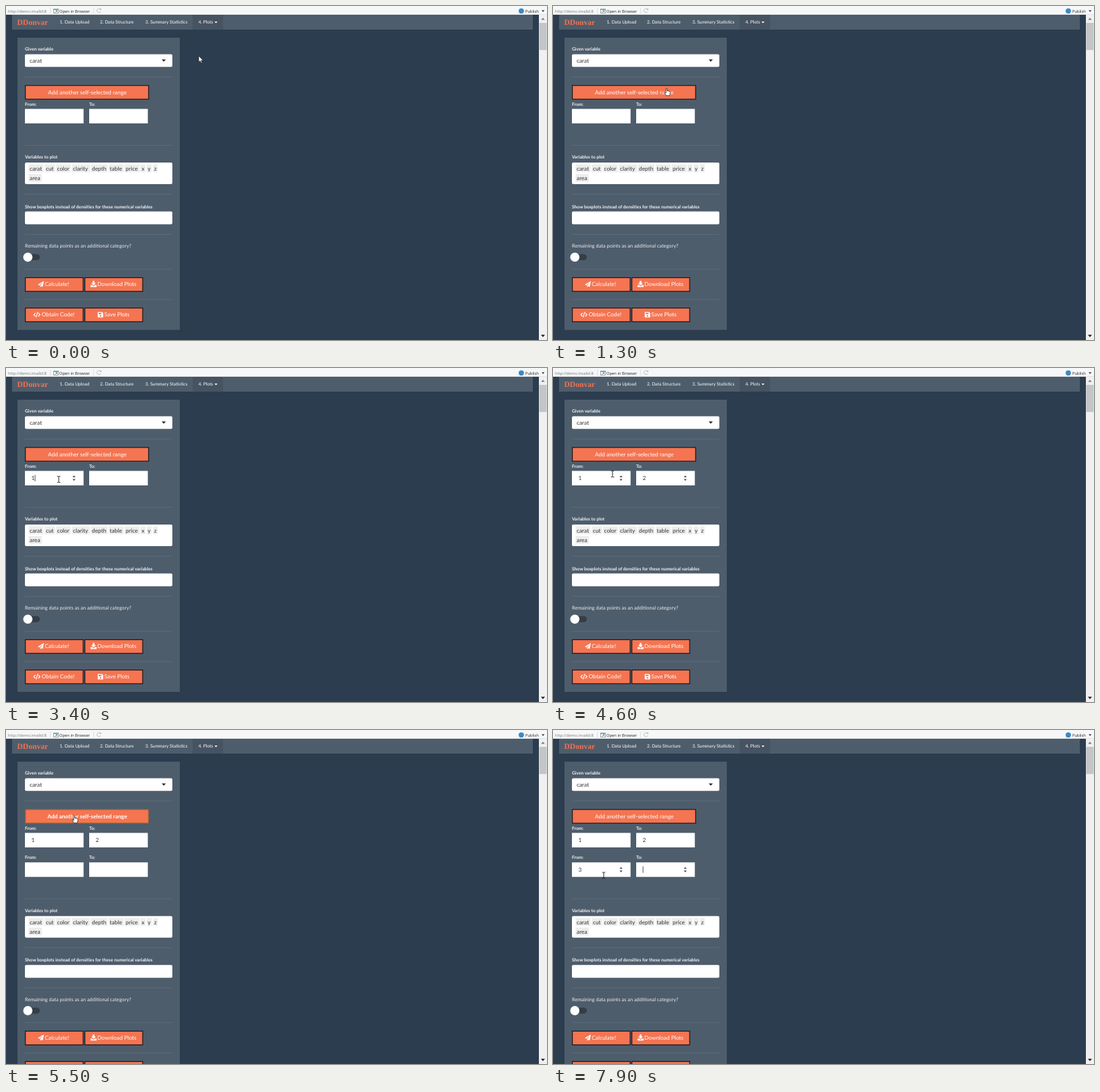
An HTML page for the animation above (8000 ms loop, 800x495 px).

```html
<!DOCTYPE html>
<html lang="en">
<head>
<meta charset="utf-8">
<title>Plot settings</title>
<style>
html, body { margin: 0; width: 100%; height: 100%; overflow: hidden; background: #2c3d4f; }
svg { display: block; width: 100vw; height: 100vh; }
text { font-family: Lato, sans-serif; font-size: 8.33px; fill: #fff; text-rendering: geometricPrecision; white-space: pre; }
.bar { font-family: "Open Sans", sans-serif; font-size: 5.8px; fill: #222; }
.nav { font-size: 6.66px; }
.label { font-size: 6.66px; font-weight: 700; fill: #f2f2f2; }
.hint { font-size: 7.4px; fill: #ebebeb; }
.dark { fill: #333; }
.brand { font: 700 11.6px "Liberation Serif", serif; fill: #f4714f; }
</style>
</head>
<body>
<svg id="stage" viewBox="0 0 800 495" preserveAspectRatio="none"></svg>
<script>
const LOOP = 8000, ROW = 43.7, ORANGE = '#f57451';

const rect = (x, y, w, h, fill, more = '') =>
  `<rect x="${x}" y="${y}" width="${w}" height="${h}" fill="${fill}" ${more}/>`;
const text = (x, y, s, cls = '', more = '') => `<text x="${x}" y="${y}" class="${cls}" ${more}>${s}</text>`;
const path = (d, fill, more = '') => `<path d="${d}" fill="${fill}" ${more}/>`;
const group = (id, body, more = '') => `<g id="${id}" ${more}>${body}</g>`;
const rule = y => rect(28, y, 218, .7, '#61707e');
const box = (y, h) => rect(28, y, 218, h, '#fff', 'rx="2"');
const button = (x, y, w, more = '') =>
  rect(x + .6, y + .6, w - 1.2, 20.3, ORANGE, `stroke="#111820" stroke-width="1.2" ${more}`);

const icons = {
  plane: 'M9 0L0 5.3L2.3 6.3L7.6 1.8L3.4 6.8V9.5L4.9 7.6L7.4 8.7Z',
  load: 'M3.2 0H5.8V3H8L4.5 6.6L1 3H3.2ZM0 6H2.4L4.5 8L6.6 6H9V9H0Z',
  save: 'M0 .5H6.5L8 2V8.5H0ZM1.3 1.6V3.6H5.6V1.6ZM4 4.8A1.3 1.3 0 1 0 4.01 4.8Z'
};
const icon = (name, x, y) => path(icons[name], '#fff', `fill-rule="evenodd" transform="translate(${x} ${y})"`);

// Number inputs: position, typed value and the time it appears
const fields = [
  { x: 28, y: 152.5, value: '1', typed: 3000 },
  { x: 123, y: 152.5, value: '2', typed: 4000 },
  { x: 28, y: 152.5 + ROW, value: '3', typed: 7200 },
  { x: 123, y: 152.5 + ROW, value: '', typed: Infinity }
];
const focusTimes = [[2300, 0], [3600, 1], [5400, -1], [6400, 2], [7600, 3]];
const ADDED = 5500;

const field = ({ x, y, value }, i) =>
  text(x, y - 5, i % 2 ? 'To:' : 'From:', 'label') +
  rect(x, y, 86.7, 21.5, '#fff') +
  text(x + 9.5, y + 13.7, value, 'dark', `id="value${i}"`) +
  rect(x + 9.7, y + 6, .8, 9.5, '#222', `id="caret${i}"`) +
  path(`M${x + 70.4} ${y + 9.6}l2.2 -2.8l2.2 2.8zM${x + 70.4} ${y + 12}h4.4l-2.2 2.8z`, '#505050', `id="spin${i}"`);

const tags = [['carat', 35, 19], ['cut', 59, 12], ['color', 75.5, 18.5], ['clarity', 99, 23.5], ['depth', 127, 21.5],
  ['table', 153.5, 19], ['price', 177, 19], ['x', 200.4, 4.2], ['y', 209.6, 4.2], ['z', 219, 3.8], ['area', 35, 16.5, 14]];
const tag = ([word, x, w, dy = 0]) =>
  rect(x - 1.6, 235 + dy, w + 3.2, 11.5, '#ededed', 'rx="1"') + text(x, 243.9 + dy, word, 'dark');

const topBar =
  rect(0, 0, 800, 13, '#f6f7f8') + rect(0, 12.4, 800, .6, '#d5d9dc') +
  text(3, 9.7, 'http://demo.invalid:8', 'bar', 'style="fill:#777"') +
  rect(65.5, 2.5, .6, 9, '#d0d0d0') +
  rect(70.5, 4.5, 7, 6, '#fff', 'stroke="#7e8b98" stroke-width=".8"') + rect(70.5, 4.3, 7, 1.6, '#7e9fc0') +
  path('M72.5 9.5L75.5 6.8M73.4 6.8H75.5V8.8', 'none', 'stroke="#3f8f56" stroke-width=".9"') +
  text(79, 9.7, 'Open in Browser', 'bar') +
  rect(129, 2.5, .6, 9, '#d0d0d0') +
  path('M140 5A3 3 0 1 0 140.2 8.2M140.5 3.5V5.5H138.5', 'none', 'stroke="#b8bec4" stroke-width="1"') +
  '<circle cx="762" cy="7.3" r="3.9" fill="#3b8ac4"/>' +
  text(768, 9.7, 'Publish', 'bar') + path('M792 6.3h4.4l-2.2 2.6z', '#444');

const nav =
  rect(9, 13, 770, 22, '#4e5d6c') + rect(276, 13, 45, 22, '#465362') +
  text(16.5, 27.7, 'DDonvar', 'brand') +
  [[79.5, '1. Data Upload'], [139, '2. Data Structure'], [206, '3. Summary Statistics'], [284.5, '4. Plots']]
    .map(([x, s]) => text(x, 26.2, s, 'nav')).join('') +
  path('M308.3 23h4.4l-2.2 2.4z', '#fff');

const scrollbar =
  rect(788, 13, 12, 482, '#f0f0f0') + rect(788.5, 25, 11, 40.3, '#c4c5c7') +
  path('M791.3 20.5l2.7 -3l2.7 3z', '#777') + path('M791 487.3h6l-3 3.4z', '#222');

const lower =
  rule(206) +
  text(28, 226.4, 'Variables to plot', 'label') + box(232, 32) + tags.map(tag).join('') + rule(278.6) +
  text(28, 299.6, 'Show boxplots instead of densities for these numerical variables', 'label') + box(304.5, 19) + rule(338) +
  text(28, 358.2, 'Remaining data points as an additional category?', 'hint') +
  rect(28, 367.7, 22, 9, '#343e49', 'rx="4.5"') + '<circle cx="32.3" cy="372.2" r="6.8" fill="#fff"/>' +
  rule(389.7) +
  button(28, 402, 86.7) + icon('plane', 47, 407.6) + text(57.3, 415.2, 'Calculate!') +
  button(116, 402, 86.7) + icon('load', 125, 407.6) + text(135, 415.2, 'Download Plots') +
  rule(434.7) +
  button(28, 447, 86.7) +
  path('M43.6 454.8L41.2 457.4L43.6 460M47.8 454.8L50.2 457.4L47.8 460M46.8 453.3L44.7 461.4', 'none', 'stroke="#fff" stroke-width="1.2"') +
  text(52.7, 460.4, 'Obtain Code!') +
  button(116, 447, 86.7) + icon('save', 135.7, 453.1) + text(145.3, 460.4, 'Save Plots');

const pointers =
  group('arrow', path('M0 0V9.2L2.1 7.3L3.6 10.6L5 10L3.6 6.8H6.5Z', '#fff', 'stroke="#111" stroke-width=".6"')) +
  group('hand', path('M-.9 .5Q0 -.6 .9 .5V4L2.2 3.8L3.6 4.2L4.8 4.8Q5.5 5.3 5.3 6.6L4.5 10.8H-.4L-3 7.2Q-3.2 5.8 -2 6.2L-.9 7.2Z',
    '#fff', 'stroke="#111" stroke-width=".7"')) +
  group('beam', path('M-2.3 -4.7Q0 -4.7 0 -3.7Q0 -4.7 2.3 -4.7M0 -3.7V3.7M-2.3 4.7Q0 4.7 0 3.7Q0 4.7 2.3 4.7', 'none',
    'stroke="#222" stroke-width="1"'));

const stage = document.getElementById('stage');
stage.innerHTML =
  rect(0, 0, 800, 495, '#2c3d4f') + topBar + nav +
  rect(17, 47, 240, 433, '#4e5d6c', 'id="panel"') +
  text(28, 66.4, 'Given variable', 'label') + box(71.5, 18.7) + text(35, 83.8, 'carat', 'dark') +
  path('M230.3 79.3h6l-3 3.2z', '#222') + rule(104.7) +
  button(28, 117.2, 183.5, 'id="add"') +
  text(120.2, 130.6, 'Add another self-selected range', '', 'id="addText" text-anchor="middle"') +
  fields.slice(0, 2).map(field).join('') +
  group('extra', fields.slice(2).map((f, i) => field(f, i + 2)).join('')) +
  group('lower', lower) + scrollbar + group('pointer', pointers);

const $ = id => document.getElementById(id);
const show = (id, on) => $(id).setAttribute('visibility', on ? 'inherit' : 'hidden');

// Pointer path: time, x, y
const keys = [[0, 285, 74], [100, 285, 74], [650, 168, 122], [1300, 168, 122], [2050, 78, 165], [3800, 78, 165],
  [4400, 88, 157], [4650, 88, 157], [5250, 101, 127], [5850, 101, 127], [6400, 75, 215.5], [LOOP, 75, 215.5]];

function pointerAt(t) {
  const i = keys.findIndex(k => k[0] > t);
  const [t0, x0, y0] = keys[i - 1], [t1, x1, y1] = keys[i];
  const u = (t - t0) / (t1 - t0), e = u * u * (3 - 2 * u);
  return [x0 + (x1 - x0) * e, y0 + (y1 - y0) * e];
}

const inside = (px, py, x, y, w, h) => px >= x && px <= x + w && py >= y && py <= y + h;

function draw(now) {
  const t = now % LOOP, added = t >= ADDED;
  const [px, py] = pointerAt(t);
  const [since, focus] = focusTimes.filter(f => f[0] <= t).pop() || [0, null];

  show('extra', added);
  $('lower').setAttribute('transform', `translate(0 ${added ? ROW : 0})`);
  $('panel').setAttribute('height', added ? 433 + ROW : 433);
  $('add').setAttribute('stroke', focus === -1 ? '#8a6420' : '#111820');
  $('addText').setAttribute('font-weight', focus === -1 ? 700 : 400);

  let overField = false;
  fields.forEach((f, i) => {
    const present = i < 2 || added;
    const hover = present && inside(px, py, f.x, f.y, 86.7, 21.5);
    const typed = t >= f.typed, focused = present && focus === i;
    const blink = (t - (typed ? Math.max(f.typed, since) : since)) % 1060 < 530;
    overField ||= hover;
    show('value' + i, present && typed);
    show('spin' + i, hover || focused);
    show('caret' + i, focused && blink);
    $('caret' + i).setAttribute('x', f.x + (typed ? 14.6 : 9.7));
  });

  const overButton = inside(px, py, 28, 117, 183.5, 21.5);
  show('hand', overButton);
  show('beam', overField);
  show('arrow', !overButton && !overField);
  $('pointer').setAttribute('transform', `translate(${px} ${py})`);
}

const start = performance.now();
function tick() {
  draw(performance.now() - start);
  requestAnimationFrame(tick);
}
tick();
</script>
</body>
</html>
```
